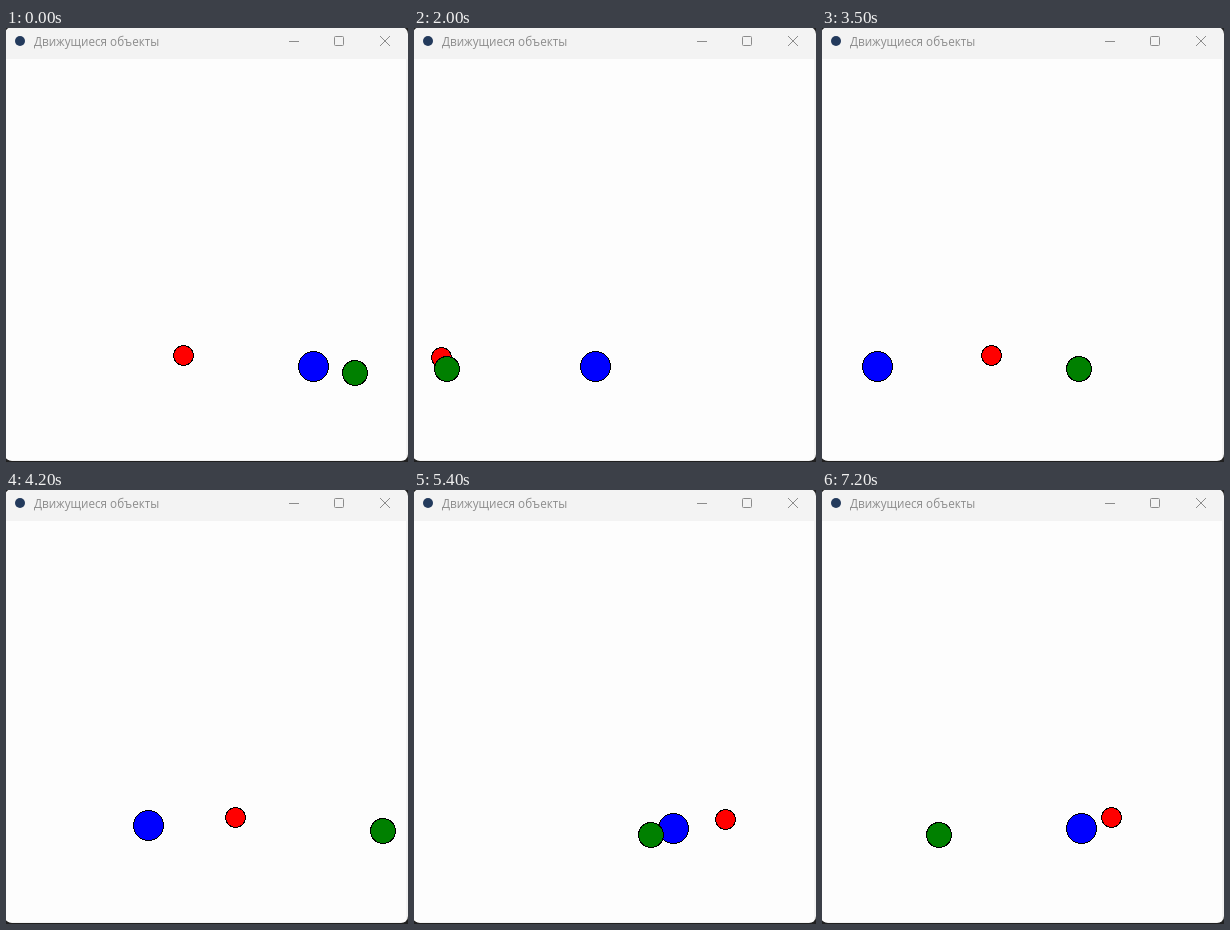
An HTML page that plays this animation: 402x434 px, repeating every 7.3 s.

```html
<!DOCTYPE html>
<html lang="ru">
<head>
<meta charset="utf-8">
<title>Движущиеся объекты</title>
<style>
html, body { margin: 0; width: 100%; height: 100%; overflow: hidden; background: #202020; }
svg { display: block; width: 402px; height: 434px; }
text { font: 11.7px "Open Sans", "Noto Sans", sans-serif; fill: #8c8c8c; }
.btn { fill: none; stroke: #8c8c8c; stroke-width: 1; }
.ball { stroke: #000; stroke-width: 1; shape-rendering: crispEdges; }
</style>
</head>
<body>
<svg viewBox="0 0 402 434">
  <defs>
    <clipPath id="area"><rect x="0" y="31" width="398" height="401"/></clipPath>
    <clipPath id="win"><rect x="-1" y="-1" width="403" height="434" rx="7"/></clipPath>
  </defs>
  <g clip-path="url(#win)">
    <rect x="-1" y="-1" width="403" height="435" fill="#f3f3f3"/>
    <rect x="0" y="31" width="400" height="401" fill="#fdfdfd"/>
  </g>
  <circle cx="14" cy="13" r="5" fill="#233a5c"/>
  <text x="28" y="18">Движущиеся объекты</text>
  <path class="btn" d="M283 13.5H293"/>
  <rect class="btn" x="328.5" y="8.5" width="9" height="9" rx="1"/>
  <path class="btn" d="M374 8L384 18M384 8L374 18"/>
  <g id="balls" clip-path="url(#area)"></g>
</svg>
<script>
const LOOP = 7300, FRAME = 100;

// time, then moves made so far by red, blue and green
const pace = [
  [0, 0, 0, 0], [800, 40, 39, 40], [1100, 54, 53, 54], [1600, 78, 77, 78],
  [2000, 97, 96, 97], [3200, 155, 153, 154], [3500, 168, 166, 167],
  [4000, 192, 189, 190], [4200, 198, 195, 197], [4800, 216, 212, 215],
  [5400, 239, 234, 236], [5600, 249, 244, 247], [6400, 287, 281, 284],
  [7200, 326, 320, 322]
];

// ys: the two heights each ball hops between
const balls = [
  { fill: "#ff0000", r: 10, x: 177.5, dir: -1, step: 2, min: 5.5, max: 387.5, ys: [327.5, 329.5] },
  { fill: "#0000ff", r: 15, x: 307.5, dir: 1, step: 3, min: 13.5, max: 388.5, ys: [338.5, 335.5] },
  { fill: "#008000", r: 12.5, x: 349, dir: 1, step: 4, min: 5, max: 385, ys: [345, 341] }
];

const layer = document.getElementById("balls");
for (const b of balls) {
  b.el = document.createElementNS(layer.namespaceURI, "circle");
  b.el.setAttribute("class", "ball");
  b.el.setAttribute("fill", b.fill);
  b.el.setAttribute("r", b.r);
  layer.append(b.el);
}

function moves(t, col) {
  let i = 1;
  while (i < pace.length - 1 && pace[i][0] < t) i++;
  const a = pace[i - 1], b = pace[i];
  return Math.round(a[col] + (b[col] - a[col]) * (t - a[0]) / (b[0] - a[0]));
}

function bounce(x, min, max) {
  const span = max - min, period = 2 * span;
  const d = ((x - min) % period + period) % period;
  return min + (d > span ? period - d : d);
}

function draw(ms) {
  const t = Math.floor((ms % LOOP) / FRAME) * FRAME;
  balls.forEach((b, i) => {
    const n = moves(t, i + 1);
    b.el.setAttribute("cx", bounce(b.x + b.dir * b.step * n, b.min, b.max));
    b.el.setAttribute("cy", b.ys[n % 2]);
  });
}

const start = performance.now();
function tick() {
  draw(performance.now() - start);
  requestAnimationFrame(tick);
}
tick();
</script>
</body>
</html>
```
